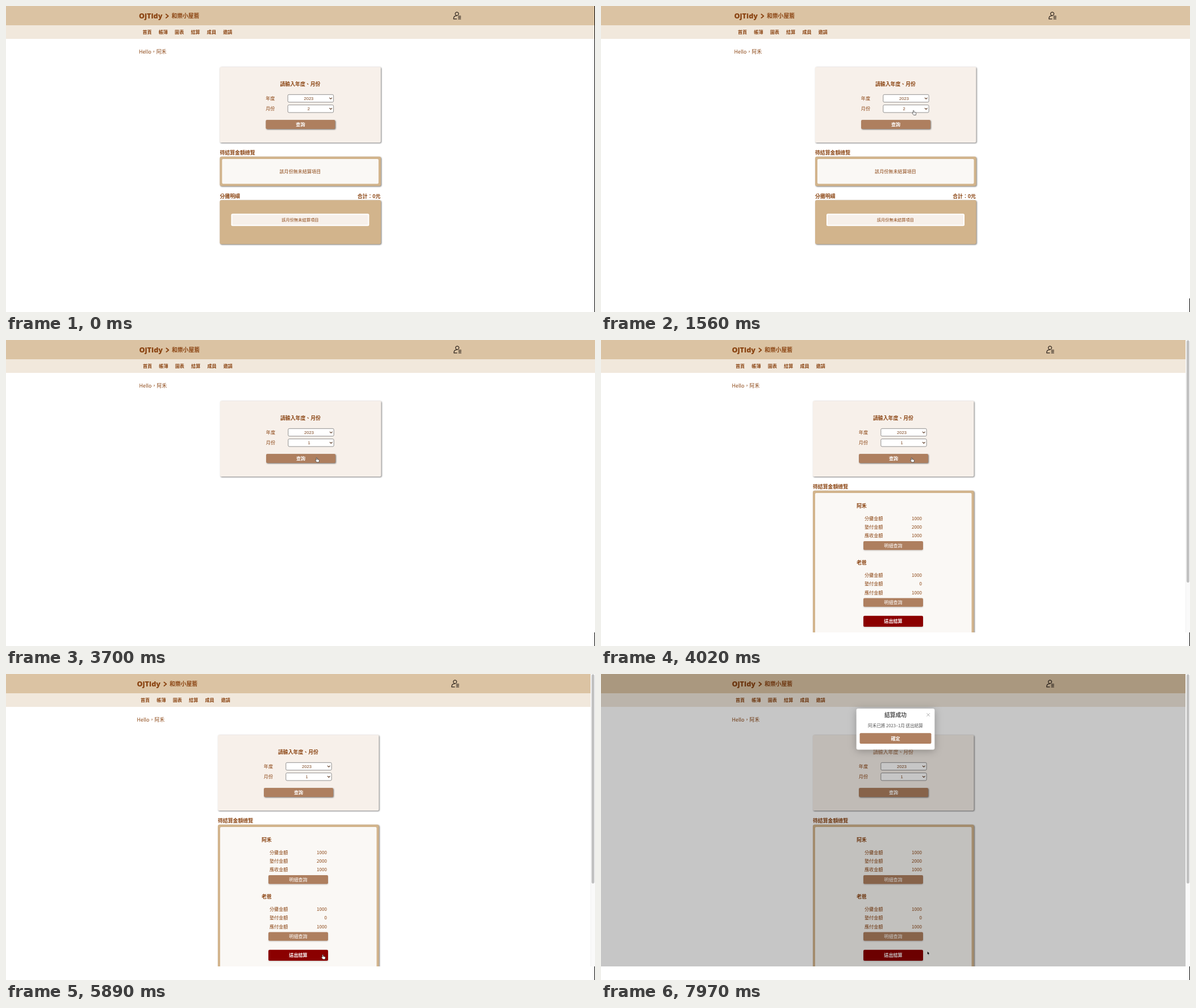
Recreate the animation shown at these times as an HTML page. Size 1037 by 540 pixels, loop 8 s.

```html
<!DOCTYPE html>
<html lang="zh-Hant">
<head>
<meta charset="utf-8">
<title>結算</title>
<style>
  html, body { margin: 0; width: 100%; height: 100%; overflow: hidden; background: #fff; }
  svg { display: block; width: 100%; height: 100%; }
  text { font-family: "Noto Sans CJK TC", "Noto Sans CJK", sans-serif; fill: #8b4513; }
  .bold { font-weight: 700; }
  .white { fill: #fff; }
  .grey { fill: #545454; }
  .brand { font-family: "Open Sans", sans-serif; font-weight: 800; }
  .option { font-family: "Liberation Sans", Arial, sans-serif; fill: #7a431c; }
  .raised { filter: drop-shadow(1.5px 1.5px 1.2px #0008); }
  .soft { filter: drop-shadow(.5px 1px 1px #0003); }
  .modal { filter: drop-shadow(0 2px 7px #0004); }
  .line { fill: none; stroke-linecap: round; stroke-linejoin: round; }
</style>
</head>
<body>
<svg id="stage" viewBox="0 0 1037 540"></svg>
<script>
const LOOP = 8000;
const USER = '阿禾';
const TAN = '#d2b48c', CARD = '#f7f0ea', PAPER = '#faf8f5', BUTTON = '#ae7f5f';

// y is the vertical middle of the glyphs
const text = (x, y, size, content, cls = '', anchor = 'start', id = '') =>
  `<text id="${id}" x="${x}" y="${y}" dy=".37em" font-size="${size}" class="${cls}" text-anchor="${anchor}">${content}</text>`;
const centred = (x, y, size, content, cls, id) => text(x, y, size, content, cls, 'middle', id);
const box = (x, y, right, bottom, fill, radius = 0, cls = '', extra = '') =>
  `<rect x="${x}" y="${y}" width="${right - x}" height="${bottom - y}" rx="${radius}" fill="${fill}" class="${cls}" ${extra}/>`;
const line = (d, stroke, width) => `<path class="line" d="${d}" stroke="${stroke}" stroke-width="${width}"/>`;
const group = (id, ...parts) => `<g id="${id}">${parts.join('')}</g>`;

const select = (y, value, id) =>
  box(496.8, y - 6.7, 577.2, y + 6.7, '#fff', 2, '', `stroke="#767676" stroke-width=".8" id="${id}Box"`) +
  centred(533.5, y + .2, 7.6, value, 'option', id) +
  line(`M570.3 ${y - .9}l2 2 2-2`, '#6b4a35', 1.3);

const button = (x, y, right, bottom, label, fill = BUTTON, shadow = 'soft', weight = 'bold') =>
  box(x, y, right, bottom, fill, 2, shadow) +
  centred((x + right) / 2, (y + bottom) / 2, 8.1, label, weight + ' white');

const member = (y, name, paid, balance) =>
  text(454, y, 8.9, name, 'bold') +
  [['分攤金額', 1000], ['墊付金額', paid], [balance, 1000]].map(([label, amount], i) =>
    text(468, y + 22.3 + i * 15.4, 8.1, label) +
    text(569, y + 22.3 + i * 15.4, 8.1, amount, '', 'end')).join('') +
  button(466, y + 62.8, 571, y + 78.2, '明細查詢', BUTTON, 'soft', '');

const header = group('header',
  text(234.5, 17.3, 12.6, 'OjTidy', 'brand'),
  line('M282.3 14.6l4 3.2-4 3.2', '#8b4513', 1.9),
  text(292, 17.2, 9.8, '和樂小屋簷', 'bold'),
  line('M794.5 10.8a3 3 0 1 1-.01 0M794 22.8h-5.4c0-4 2-5.6 5.6-5.6M797 18.2h4.2M797 20.6h4.2M797 23h4.2', '#2b211a', 1.2),
  ...['首頁', '帳簿', '圖表', '結算', '成員', '邀請'].map((label, i) => text(241 + i * 28.35, 46.3, 8.1, label, 'bold')),
  text(234.6, 80.8, 8.9, 'Hello，' + USER));

const form = group('form',
  box(377, 107.5, 660.5, 241, CARD, 2, 'raised'),
  centred(518.5, 137.8, 8.9, '請輸入年度、月份', 'bold', 'prompt'),
  text(457.8, 163, 8.1, '年度'), select(163, 2023, 'year'),
  text(457.8, 181.3, 8.1, '月份'), select(181.3, 2, 'month'),
  button(458, 201, 580, 217, '查詢', BUTTON, 'raised'));

const overviewTitle = text(377, 259.2, 8.9, '待結算金額總覽', 'bold');

const empty = group('empty',
  overviewTitle,
  box(377, 265.7, 660.7, 317.8, TAN, 3, 'raised'),
  box(381, 270, 656.5, 313.7, PAPER, 2),
  centred(518.5, 292, 8.1, '該月份無未結算項目'),
  text(377, 336, 8.9, '分攤明細', 'bold'),
  text(660, 336, 8.9, '合計：0元', 'bold', 'end'),
  box(377, 342.5, 660.7, 420.2, TAN, 3, 'raised'),
  box(398, 367.5, 639, 387.3, CARD, 1.5, '', 'stroke="#fff" stroke-width="2"'),
  centred(518.5, 377.2, 7.25, '該月份無未結算項目'));

const results = group('results',
  overviewTitle,
  box(377, 265.7, 660.7, 560, TAN, 3, 'raised'),
  box(381, 270, 656.5, 560, PAPER, 2),
  member(292.3, USER, 2000, '應收金額'),
  member(392.6, '老爸', 0, '應付金額'),
  button(466, 486.7, 571, 506, '送出結算', '#8b0000'));

const dialog = group('dialog',
  box(0, 0, 1029, 516, '#000', 0, '', 'opacity=".225"'),
  box(449.6, 61, 587.4, 133.5, '#fff', 3, 'modal'),
  centred(518.5, 72, 9.8, '結算成功', 'bold grey'),
  centred(518.5, 90.8, 7.6, USER + '已將 2023–1月 送出結算', 'grey'),
  button(455.5, 104.2, 581.5, 123, '確定', '#b08060', ''),
  group('close', line('M573.7 69.5l5 5m0-5l-5 5', '#999', .8)));

const cursor = group('cursor',
  '<path id="arrow" d="M0 0v6.6l1.6-1.4 1 2.3 1.2-.5-1-2.2h2.2z" fill="#111" stroke="#fff" stroke-width=".5"/>',
  '<path id="hand" d="M2 5.4V1.2q.8-1.1 1.6 0V3.7l3.1.8q.7.3.6 1.2L6.8 9H3L.5 5.9q-.2-1 .8-.9z" fill="#fff" stroke="#333" stroke-width=".7"/>');

stage.innerHTML =
  box(0, 0, 1037, 34, '#dbc3a3') + box(0, 34, 1037, 58, '#f1e8dc') +
  group('page', header, form, empty, results) +
  dialog +
  box(0, 516, 1037, 540, '#fff') +
  group('scrollbar',
    box(1029, 0, 1037, 516, '#fafafa'), box(1029, 0, 1029.5, 516, '#e8e8e8'),
    box(1031, .5, 1035.8, 428, '#c1c1c1', 2.4, '', 'id="thumb"')) +
  box(1036, 516, 1037, 540, '#000', 0, '', 'id="edge"') +
  cursor;

// time, x, y, pointing hand
const path = [
  [1060, 653.5, 230.7, 0], [1480, 562, 190, 0], [1560, 547.5, 183.5, 1], [2989, 547.5, 183.5, 1],
  [2990, 541, 180.5, 1], [3060, 544, 197, 0], [3380, 554, 285, 0], [3569, 554, 285, 0],
  [3570, 544.2, 206.8, 1], [4869, 544.2, 206.8, 1], [4870, 580, 225, 0], [4940, 615, 244.5, 0], [5139, 615, 244.5, 0],
  [5140, 630, 262, 0], [5330, 658, 330, 0], [5600, 627, 440, 0], [5890, 555, 494.5, 1], [7899, 555, 494.5, 1],
  [7900, 564, 492, 0], [7970, 574.3, 489, 0], [LOOP, 574.3, 489, 0]];
const CURSOR_STEP = 70;

const el = id => document.getElementById(id);
const show = (id, on) => el(id).style.display = on ? '' : 'none';
const set = (id, attributes) => {
  for (const name in attributes) el(id).setAttribute(name, attributes[name]);
};

function drawCursor(t) {
  const next = path.findIndex(key => key[0] > t);
  show('cursor', next > 0);
  if (next < 1) return;
  const [t0, x0, y0, hand] = path[next - 1], [t1, x1, y1] = path[next];
  const p = Math.floor((t - t0) / CURSOR_STEP) * CURSOR_STEP / (t1 - t0);
  set('cursor', { transform: `translate(${x0 + (x1 - x0) * p} ${y0 + (y1 - y0) * p})` });
  show('arrow', !hand);
  show('hand', hand);
}

function draw(t) {
  const loaded = t >= 4020, settled = t >= 7290, focused = t >= 2990 && t < 3570;
  set('page', { transform: `translate(${t < 160 ? -.6 : loaded ? -4 : 0} 0)` });
  el('month').textContent = t < 2990 ? 2 : 1;
  set('monthBox', { stroke: focused ? '#1b5a9c' : '#767676', 'stroke-width': focused ? 1.7 : .8 });
  show('empty', t < 3700);
  show('results', loaded);
  show('scrollbar', loaded);
  set('thumb', { height: t < 4600 ? 427.7 : 369.3 });
  show('dialog', settled);
  show('close', t >= 7370);
  set('prompt', { opacity: settled ? .55 : 1 });
  set('edge', t < 160 ? { y: 0, height: 540 } : { y: 516, height: 24 });
  drawCursor(t);
}

const start = performance.now();
function tick() {
  draw((performance.now() - start) % LOOP);
  requestAnimationFrame(tick);
}
tick();
</script>
</body>
</html>
```
